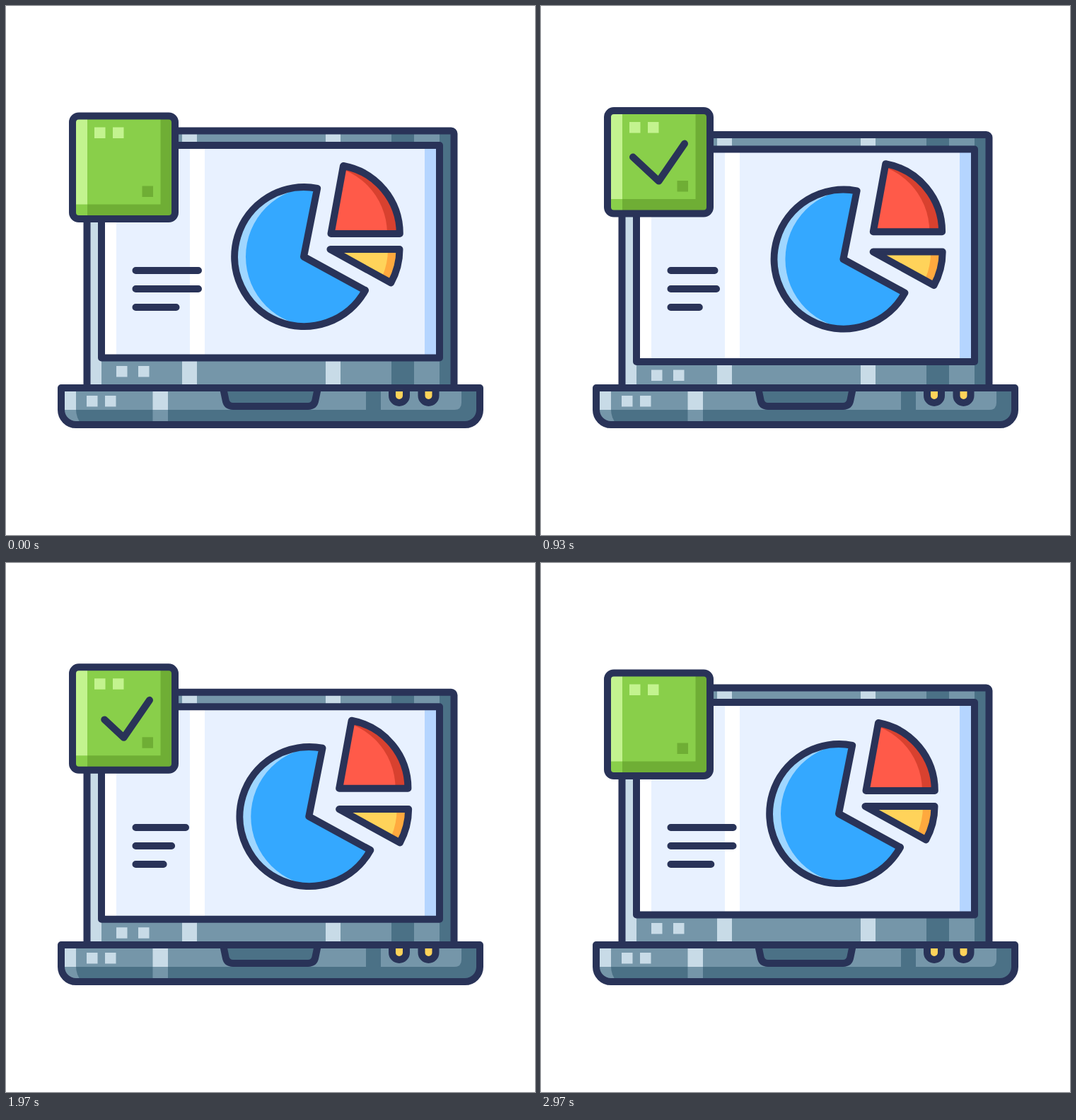
Animation, 748 px wide and 748 px high, one loop 3 s. Source, as an HTML page:

```html
<!DOCTYPE html>
<html lang="en">
<head>
<meta charset="utf-8">
<title>Laptop report</title>
<style>
  html, body { margin: 0; width: 100%; height: 100%; overflow: hidden; background: #fff; }
  svg { display: block; width: 100%; height: 100%; }
  .line { fill: none; stroke: #293358; stroke-width: 10; stroke-linecap: round; stroke-linejoin: round; }
  .light { fill: #c8dbe7; }
  .mid { fill: #7596a9; }
  .dark { fill: #4b7186; }
  .white { fill: #fff; }
</style>
</head>
<body>
<svg viewBox="0 0 748 748">
  <defs>
    <path id="basePath" d="M78 540H670V571A21 21 0 0 1 649 592H99A21 21 0 0 1 78 571Z"/>
    <path id="bluePath" d="M421 354.5L508 402A98.5 98.5 0 1 1 440.2 257.8Z"/>
    <path id="redPath" d="M459.5 322L477 226A97.5 97.5 0 0 1 556.8 322Z"/>
    <path id="yellowPath" d="M458.5 344H556.5A98 98 0 0 1 544.3 391.4Z"/>
    <rect id="boxPath" x="94" y="155.5" width="145" height="145.5" rx="9"/>
    <clipPath id="baseClip"><use href="#basePath"/></clipPath>
    <clipPath id="blueClip"><use href="#bluePath"/></clipPath>
    <clipPath id="redClip"><use href="#redPath"/></clipPath>
    <clipPath id="yellowClip"><use href="#yellowPath"/></clipPath>
    <clipPath id="boxClip"><use href="#boxPath"/></clipPath>
  </defs>

  <g id="lid">
    <path class="mid" d="M114.5 176.5H633.5V560H114.5Z"/>
    <path class="light" d="M114.5 176.5H135V560H114.5ZM249 180h21v380h-21ZM452 180h21v380h-21ZM156 509h15.5v15.5h-15.5ZM187 509h15.5v15.5h-15.5Z"/>
    <path class="dark" d="M545 180h32v380h-32ZM613 177h20v383h-20Z"/>
    <rect class="line" x="114.5" y="176.5" width="519" height="390" rx="4"/>
    <path fill="#e8f1ff" d="M135 197H613V497.5H135Z"/>
    <path class="white" d="M135 197h21v300.5h-21ZM260 197h21v300.5h-21Z"/>
    <path fill="#b5d5ff" d="M592 197h21v300.5h-21Z"/>
    <path class="line" d="M135 197H613V497.5H135Z"/>
  </g>

  <path class="line" id="text"/>

  <g id="blue">
    <g clip-path="url(#blueClip)">
      <use href="#bluePath" fill="#9fd6ff"/>
      <circle cx="437.5" cy="354.5" r="98.5" fill="#34a8ff"/>
    </g>
    <use href="#bluePath" class="line"/>
  </g>
  <g id="red">
    <g clip-path="url(#redClip)">
      <use href="#redPath" fill="#d8412f"/>
      <circle cx="441.5" cy="322" r="97.5" fill="#ff5a49"/>
    </g>
    <use href="#redPath" class="line"/>
  </g>
  <g id="yellow">
    <g clip-path="url(#yellowClip)">
      <use href="#yellowPath" fill="#ffa93e"/>
      <circle cx="442" cy="344" r="98" fill="#ffd35a"/>
    </g>
    <use href="#yellowPath" class="line"/>
  </g>

  <g clip-path="url(#baseClip)">
    <use href="#basePath" class="dark"/>
    <path class="mid" d="M78 540H509V571H99Q99 582 107 592H78ZM530 540H644V561Q644 571 634 571H530ZM207.500 571h21.500v21h-21.500Z"/>
    <path class="light" d="M78 540h21v31h-21ZM207.500 540h21.500v31h-21.500ZM114 551h15.500v15.500h-15.500ZM140 551h15.500v15.500h-15.500Z"/>
  </g>
  <path class="line" style="fill:#4b7186" d="M307 540L310.500 557Q312 566 321 566H427Q436 566 437.500 557L441 540"/>
  <path class="line" style="fill:#ffd35a" d="M546 540V551a10 10 0 0 0 20 0V540M587.500 540V551a10 10 0 0 0 20 0V540"/>
  <use href="#basePath" class="line"/>

  <g id="box">
    <g clip-path="url(#boxClip)">
      <use href="#boxPath" fill="#89cf4a"/>
      <path fill="#c3f38f" d="M94 155h21v125.500h-21ZM125 171.500h15.500v15.500h-15.500ZM151 171.500h15.500v15.500h-15.500Z"/>
      <path fill="#6fae35" d="M218.500 155H239V301H115V280.500H218.500ZM192.500 254.500h15.500v15.500h-15.500Z"/>
    </g>
    <use href="#boxPath" class="line"/>
    <path class="line" id="check" pathLength="1" d="M130 221L166.500 255L203 202"/>
  </g>
</svg>
<script>
const LOOP = 3000, FRAMES = 90, STEP = 15;
const $ = id => document.getElementById(id);
const clamp = x => Math.min(1, Math.max(0, x));
const smooth = x => (x = clamp(x), x * x * (3 - 2 * x));

// Quick start, long settle: cubic-bezier(.33, 0, .5, 1)
function settle(x) {
  let lo = 0, hi = 1;
  for (let i = 0; i < 20; i++) {
    const s = (lo + hi) / 2, r = 1 - s;
    if (r * r * s + 1.5 * r * s * s + s * s * s < x) lo = s; else hi = s;
  }
  return smooth(lo);
}

// Right end of each text line, one key every STEP frames
const rows = [
  { y: 374, ends: [272, 236, 246, 254, 254, 237.5, 272] },
  { y: 400, ends: [272, 230, 249, 245, 234, 222, 272] },
  { y: 426, ends: [240.5, 211, 224.5, 234, 222.5, 223, 240.5] }
];

function rowPath({ y, ends }, frame) {
  const k = Math.floor(frame / STEP), p = smooth(frame / STEP - k);
  return `M183.5 ${y}H${ends[k] + (ends[k + 1] - ends[k]) * p}`;
}

const move = (id, x, y) => $(id).setAttribute("transform", `translate(${x} ${y})`);

function draw(now) {
  const frame = (now % LOOP) / LOOP * FRAMES;
  const swing = 1 - Math.abs(frame / 45 - 1);
  const p = smooth(swing);

  move("lid", 0, 8.2 * p);
  move("blue", 9.5 * p, 5.2 * p);
  move("red", 15.2 * p, -4.2 * p);
  move("yellow", 16.5 * p, 5.3 * p);
  move("box", 0, -9.6 * settle(swing));
  $("text").setAttribute("d", rows.map(r => rowPath(r, frame)).join(""));

  const from = smooth((frame - 55) / 20), to = smooth(frame / 20);
  const check = $("check").style;
  check.visibility = to - from > 0.005 ? "visible" : "hidden";
  check.strokeDasharray = `${to - from} 2`;
  check.strokeDashoffset = -from;
}

const start = performance.now();
function tick() {
  draw(performance.now() - start);
  requestAnimationFrame(tick);
}
tick();
</script>
</body>
</html>
```
